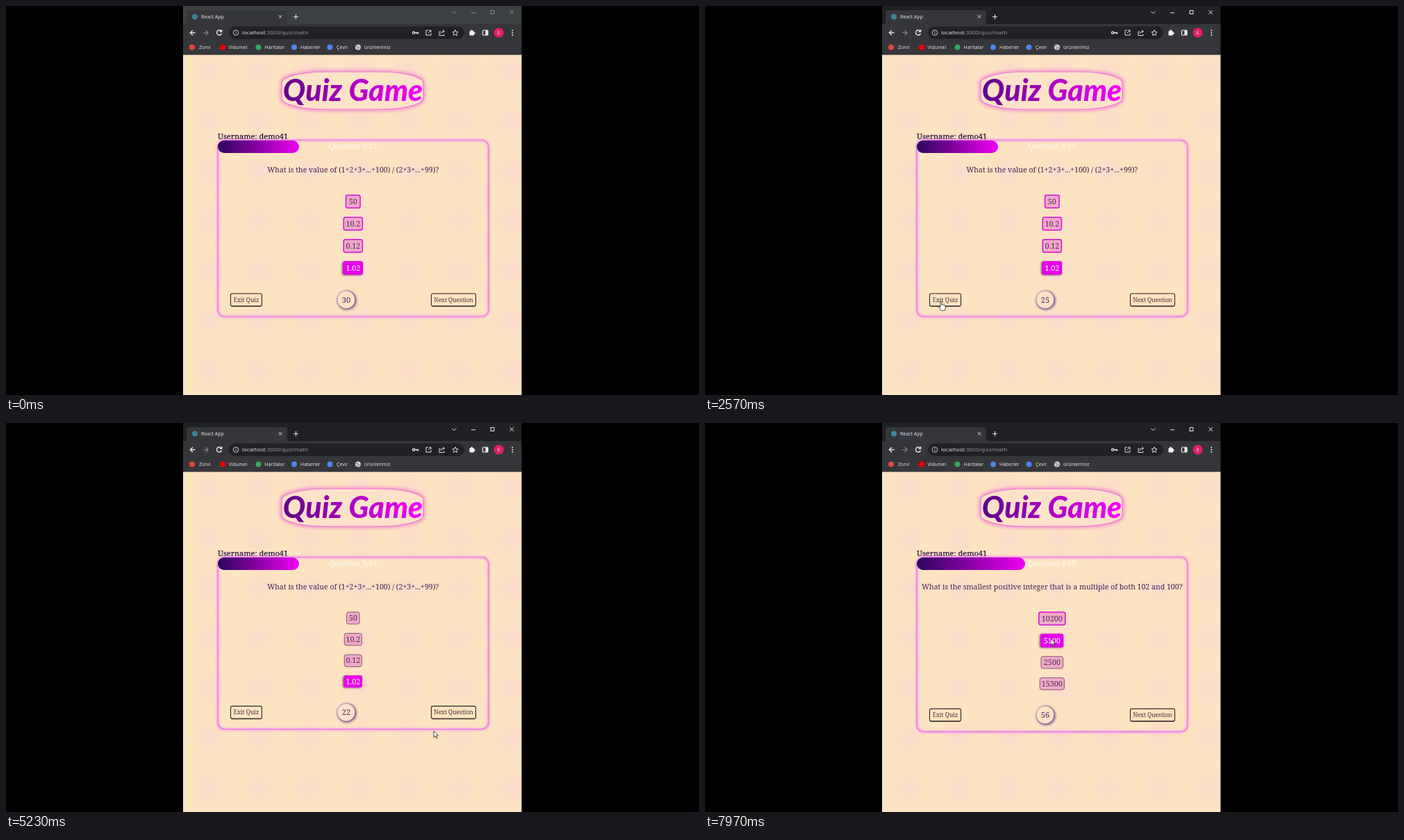
Write an HTML page that moves like this. It is 998 px wide and 561 px high and loops after 8 s.

```html
<!DOCTYPE html>
<html lang="en">
<head>
<meta charset="utf-8">
<title>Quiz Game</title>
<style>
  html, body { margin: 0; width: 100%; height: 100%; overflow: hidden; background: #000; }
  svg { display: block; width: 100%; height: 100%; }
  text { font-family: "Noto Serif", serif; white-space: pre; }
  .ui { font-family: "Open Sans", sans-serif; font-size: 7px; fill: #eceded; }
  .line { fill: none; stroke: #dfe1e5; stroke-width: 1.2; }
  .mid { text-anchor: middle; }
</style>
</head>
<body>
<svg viewBox="0 0 998 561">
  <defs>
    <linearGradient id="titleInk" gradientUnits="userSpaceOnUse" x1="402" y1="0" x2="598" y2="0">
      <stop stop-color="#62008c"/><stop offset=".45" stop-color="#a900bd"/><stop offset="1" stop-color="#f600ff"/>
    </linearGradient>
    <linearGradient id="barInk">
      <stop stop-color="#2c0860"/><stop offset=".5" stop-color="#8a00a4"/><stop offset="1" stop-color="#f000f5"/>
    </linearGradient>
    <linearGradient id="ring" x2="1" y2="1">
      <stop stop-color="#efb8c8"/><stop offset="1" stop-color="#56306f"/>
    </linearGradient>
    <radialGradient id="blot">
      <stop stop-color="#f8d5d5" stop-opacity=".6"/><stop offset="1" stop-color="#f8d5d5" stop-opacity="0"/>
    </radialGradient>
    <pattern id="paper" x="257" y="58" width="72" height="72" patternUnits="userSpaceOnUse">
      <rect width="72" height="72" fill="#fce3c1"/>
      <circle cx="36" cy="36" r="27" fill="url(#blot)"/>
    </pattern>
    <filter id="glow" x="-20%" y="-40%" width="140%" height="180%"><feGaussianBlur stdDeviation="2.5"/></filter>
    <filter id="soft" x="-40%" y="-40%" width="180%" height="180%"><feGaussianBlur stdDeviation="1.4"/></filter>
    <clipPath id="window"><rect x="255" width="487.5" height="561"/></clipPath>
  </defs>
  <rect width="998" height="561"/>
  <g clip-path="url(#window)">
    <rect x="255" y="70" width="488" height="491" fill="url(#paper)"/>
    <g id="chrome"></g>
    <g id="banner">
      <path id="lens" fill="none"/>
      <text x="499.5" y="137" class="mid" fill="url(#titleInk)"
        style="font: italic 800 43px Lato, sans-serif">Quiz Game</text>
    </g>
    <g id="page"></g>
    <g id="cursor"><path id="pointer" fill="#fff" stroke="#222" stroke-width=".8" stroke-linejoin="round"/></g>
  </g>
</svg>
<script>
const LOOP = 8000, TICK = 500;
const $ = id => document.getElementById(id);

const QUESTIONS = [
  { number: 3, text: 'What is the value of (1+2+3+...+100) / (2+3+...+99)?',
    options: ['50', '10.2', '0.12', '1.02'], widths: [20, 26.5, 26.5, 26.5] },
  { number: 4, text: 'What is the smallest positive integer that is a multiple of both 102 and 100?',
    options: ['10200', '5100', '2500', '15300'], widths: [37.5, 31, 33, 36.5] }
];
const CATEGORIES = [
  ['Math', 329.5, 44, 248.5], ['Geography', 465.5, 78, 248.5], ['Art', 636, 32, 248.5],
  ['General Knowledge', 314.5, 128, 321], ['Science', 504.5, 59.5, 321], ['History', 626, 57, 321],
  ['Sport', 354, 45.5, 393.5], ['Entertaintment', 541, 102.5, 393.5]
];

// State changes: each entry overrides what came before it.
// "touched" marks options that have been clicked and keep a thick border.
const EVENTS = [
  [0, { quiz: true, question: 0, selected: 3, touched: '1111', focused: false, count: 30, since: -250 }],
  [600, { selected: 1, focused: true }],
  [900, { selected: 0 }],
  [1250, { selected: 2 }],
  [1550, { selected: 3 }],
  [2620, { quiz: false }],
  [3680, { quiz: true, touched: '0000', count: 25, since: 3680 }],
  [5900, { question: 1, selected: -1, count: 60, since: 5900 }],
  [7350, { selected: 0, touched: '1000' }],
  [7750, { selected: 1, touched: '1100' }]
];
const PATH = [
  [0, 760, 340], [180, 760, 340], [560, 503, 317], [640, 503, 315], [790, 501, 288], [930, 501, 288],
  [1180, 500, 346], [1300, 500, 346], [1480, 500, 376], [1700, 500, 376], [2250, 342, 428],
  [2530, 340, 427], [2700, 340, 427], [3150, 353, 269], [3900, 353, 269], [4900, 612, 444],
  [5230, 616, 444], [5600, 645, 420], [6600, 645, 420], [7250, 500, 282], [7450, 500, 282],
  [7700, 498, 311], [LOOP, 498, 311]
];
const ARROW = 'M0 0V9.2L2.2 7.3L3.7 10.7L5.2 10L3.7 6.8H6.5Z';
const HAND = 'M-1 0Q0-1 1 0V4Q2 3.2 3 4.2Q4 3.5 5 4.7Q6.5 4.3 6.5 6V8Q6.3 10 5.2 12H-.4Q-1.6 9.5-3.6 7.5Q-3.4 5.8-1 7.2Z';

const text = (value, x, y, size, fill, extra = '') =>
  `<text x="${x}" y="${y}" font-size="${size}" fill="${fill}" ${extra}>${value}</text>`;
const centred = (value, x, y, size, fill, extra = '') => text(value, x, y, size, fill, `class="mid" ${extra}`);
const box = (x, y, w, h, r, fill, stroke = 'none', width = 1, extra = '') =>
  `<rect x="${x}" y="${y}" width="${w}" height="${h}" rx="${r}" fill="${fill}" stroke="${stroke}" stroke-width="${width}" ${extra}/>`;
const label = (value, x, y, extra = '') => `<text class="ui" x="${x}" y="${y}" ${extra}>${value}</text>`;
const line = (d, extra = '') => `<path class="line" d="${d}" ${extra}/>`;
const dot = (x, y, r, fill) => `<circle cx="${x}" cy="${y}" r="${r}" fill="${fill}"/>`;

function drawChrome({ focused, quiz }) {
  const control = `style="stroke:${focused ? '#f1f1f1' : '#8b8d90'};stroke-width:1"`;
  const bookmarks = [
    ['Zorvi', 278, 268, '#e5483c'], ['Vidumel', 320.5, 312, '#f00000'], ['Haritalar', 372.5, 363.5, '#35a660'],
    ['Haberler', 424, 415, '#4c86ee'], ['Çevir', 476, 466.5, '#4c86ee']
  ];
  return box(255, 0, 488, 27, 0, focused ? '#202124' : '#3c4043')
    + `<path d="M257 27Q260 27 260 23V10Q260 6 264 6H401Q405 6 405 10V23Q405 27 408 27Z" fill="#35363a"/>`
    + box(255, 26, 488, 44.5, 0, '#35363a')
    + dot(272, 15.5, 4, '#3d8499') + label('React App', 281, 18)
    + line('M392.8 13.2l4.4 4.4m0-4.4l-4.4 4.4', 'style="stroke-width:1"') + line('M414 15.5h7m-3.5-3.5v7')
    + line('M642.5 7.8l3 3l3-3', control) + line('M670 9.8h6', control)
    + line('M698 6.5h5v5h-5z', control) + line('M725.5 6.3l5.6 5.6m0-5.6l-5.6 5.6', control)
    + line('M272.5 38.5h-7m3.4-3.5l-3.5 3.5l3.5 3.5', 'style="stroke-width:1.5"')
    + line('M284 38.5h7m-3.4-3.5l3.5 3.5l-3.5 3.5', 'style="stroke:#85878b"')
    + line('M310 36.2a3.6 3.6 0 1 0 .5 3.3M310.6 34v3h-3', 'style="stroke-width:1.5"')
    + box(321, 29.5, 339, 18, 9, '#202124')
    + line('M327.2 38.5a3.8 3.8 0 1 0 7.6 0a3.8 3.8 0 1 0-7.6 0M331 38v2.3M331 36v1', 'style="stroke-width:.9"')
    + `<text class="ui" x="340" y="41.3" style="font-size:8px">localhost<tspan fill="#9aa0a6">:3000/${quiz ? 'quiz/math' : 'categories'}</tspan></text>`
    + line('M585.5 38.5a1.6 1.6 0 1 0 3.2 0a1.6 1.6 0 1 0-3.2 0M589 38.5h4.5v2m-2-2v1.5', 'style="stroke-width:1.4"')
    + line('M608 35h-3v7h7v-3M609 35h3v3M612 35l-4 4', 'style="stroke-width:1"')
    + line('M626 37h-2v5.5h7v-2M626 40q.5-3.5 5-3.5m-2-2l2.5 2l-2.5 2', 'style="stroke-width:1"')
    + line('M647 34.5l1.2 2.7l2.9.3l-2.2 2l.6 2.9l-2.5-1.5l-2.5 1.5l.6-2.9l-2.2-2l2.9-.3z', 'style="stroke-width:1"')
    + box(667.5, 36, 6.5, 6.5, 1, '#f1f1f1') + dot(670.7, 35.7, 1.4, '#f1f1f1') + dot(674.3, 39.2, 1.4, '#f1f1f1')
    + box(686.5, 35, 7.5, 7, 1, 'none', '#f1f1f1', 1.2) + box(690.5, 35, 3.5, 7, 0, '#f1f1f1')
    + dot(709.7, 38.5, 7, '#e01e6c') + label('E', 709.7, 41, 'text-anchor="middle"')
    + [35.3, 38.5, 41.7].map(y => dot(729.3, y, 1, '#f1f1f1')).join('')
    + bookmarks.map(([name, x, iconX, fill]) => dot(iconX, 59.5, 4, fill) + label(name, x, 62)).join('')
    + dot(507, 59.5, 4, '#d5d7da') + line('M503.5 58h3l1 2l3 1M506 63l1-3', 'style="stroke:#55585c;stroke-width:.8"')
    + label('ürünlerimiz', 516, 62);
}

function optionLayout(state) {
  let top = 272;
  return QUESTIONS[state.question].options.map((value, i) => {
    const thick = state.touched[i] === '1', on = state.selected === i;
    const h = thick ? 20 : on ? 17.6 : 18.7;
    const w = QUESTIONS[state.question].widths[i] + (thick ? 2 : 0);
    const item = { value, thick, on, x: 499.8 - w / 2, y: top, w, h };
    top += h + 12;
    return item;
  });
}

function drawOption({ value, thick, on, x, y, w, h }) {
  const frame = on
    ? box(x - 1.2, y + .8, w, h - .8, 2.5, '#40104f', 'none', 0, 'filter="url(#soft)" opacity=".8"')
      + box(x, y, w, h - .4, 2.5, '#e800ec')
    : box(x + .7, y + .7, w - 1.4, h - 1.4, 2.7, '#f1a9c8', thick ? '#d80fd6' : '#73516b', thick ? 1.5 : .9);
  return frame + centred(value, 499.8, y + h / 2 + 3.7, 10.8, on ? '#fff' : '#552a57');
}

function drawQuiz(state, t, hits) {
  const { number, text: prompt } = QUESTIONS[state.question];
  const options = optionLayout(state);
  const last = options[3], bottom = last.y + last.h + 60, row = bottom - 24.3;
  const seconds = state.count - Math.floor((t - state.since) / TICK);
  const button = (value, x, w) => {
    hits.push([x, row - 9.5, w, 19]);
    return box(x + .5, row - 9, w - 1, 18, 2.3, 'none', '#33262c', 1.1)
      + line(`M${x + 2} ${row + 9.2}h${w - 4}`, 'style="stroke:#33262c"')
      + centred(value, x + w / 2, row + 3, 8.4, '#4b2c3d');
  };
  options.forEach(o => o.on || hits.push([o.x, o.y, o.w, o.h]));
  const panel = [305, 193.5, 390, bottom - 193.5, 10, 'none'];
  return text('Username: demo41', 305, 191.5, 11, '#1e0b40', 'stroke="#1e0b40" stroke-width=".2"')
    + box(...panel, '#f58af0', 2.5, 'filter="url(#soft)"') + box(...panel, '#ec7be4', 1.2)
    + box(305, 194, 39 * number, 18, 9, 'url(#barInk)')
    + centred(`Question ${number}/10`, 499.6, 206.4, 10.6, '#fffdf3')
    + centred(prompt, 499.8, 239.8, 10.55, '#4a1f58')
    + options.map(drawOption).join('')
    + button('Exit Quiz', 323, 46) + button('Next Question', 612, 65)
    + `<circle cx="491" cy="${row + 1}" r="13" fill="none" stroke="#72508a" stroke-width="2" filter="url(#soft)"/>`
    + `<circle cx="490" cy="${row}" r="13" fill="#fce1c7" stroke="url(#ring)" stroke-width="1.1"/>`
    + centred(seconds, 490, row + 4, 11, '#4a2859');
}

function drawCategories(hits, [px, py]) {
  const inside = (x, y, w, h) => px > x && px < x + w && py > y && py < y + h;
  const link = (x, w) => {
    hits.push([x, 437, w, 18]);
    return box(x + .5, 437, w - 1, 18, 2.5, 'none', '#3a2a2d', 1);
  };
  return text('Username: demo41', 305, 191.5, 11, '#29106b')
    + centred('Categories', 498.7, 208.3, 15.8, '#160f16', 'font-weight="500"')
    + CATEGORIES.map(([name, x, w, y]) => {
      hits.push([x, y, w, 27.5]);
      const shade = inside(x, y, w, 27.5)
        ? box(x - 1, y - 1, w + 3, 30, 4, '#2c0740', 'none', 0, 'filter="url(#glow)"') : '';
      return shade + box(x + .5, y + .5, w - 1, 26.5, 2.5, '#68009d', '#32103f', 1.2)
        + centred(name, x + w / 2, y + 17.7, 12, '#fff');
    }).join('')
    + link(317, 52.5) + text('Log out', 331, 449.3, 9.5, '#51333f')
    + line('M325 443.5v-1.2h5v7.4h-5v-1.2M328 446h-5m1.7-1.8l-1.8 1.8l1.8 1.8', 'style="stroke:#51333f;stroke-width:.9"')
    + link(583.5, 96.5) + text('View Scoreboard', 587.5, 449.3, 9.5, '#51333f')
    + line('M668 443.5h3m-3 2.5h6m-6 2.5h3m0-5l3 2.5l-3 2.5', 'style="stroke:#51333f;stroke-width:.9"');
}

function cursorAt(t) {
  const i = Math.max(1, PATH.findIndex(p => p[0] > t));
  const [t0, x0, y0] = PATH[i - 1], [t1, x1, y1] = PATH[i];
  const k = (t - t0) / (t1 - t0), ease = k * k * (3 - 2 * k);
  return [x0 + (x1 - x0) * ease, y0 + (y1 - y0) * ease];
}

const drawn = {};
function update(id, markup) {
  if (drawn[id] !== markup) $(id).innerHTML = drawn[id] = markup;
}

function frame() {
  const t = performance.now() % LOOP;
  const state = Object.assign({}, ...EVENTS.filter(e => e[0] <= t).map(e => e[1]));
  const [x, y] = cursorAt(t), hits = [];
  update('chrome', drawChrome(state));
  update('page', state.quiz ? drawQuiz(state, t, hits) : drawCategories(hits, [x, y]));
  const over = hits.some(([l, top, w, h]) => x >= l && x <= l + w && y >= top && y <= top + h);
  $('pointer').setAttribute('d', over ? HAND : ARROW);
  $('cursor').setAttribute('transform', `translate(${x} ${y})`);
  requestAnimationFrame(frame);
}

const lens = $('lens');
lens.setAttribute('d', 'M397 111A62 16 0 0 1 459 95H539A62 16 0 0 1 601 111V133A62 16 0 0 1 539 149H459A62 16 0 0 1 397 133Z');
const halo = lens.cloneNode();
halo.removeAttribute('id');
halo.setAttribute('style', 'stroke:#f58ccb;stroke-width:5;filter:url(#glow)');
lens.before(halo);
lens.setAttribute('style', 'fill:#fce3c8;stroke:#ee78dc;stroke-width:1.2');
frame();
</script>
</body>
</html>
```
